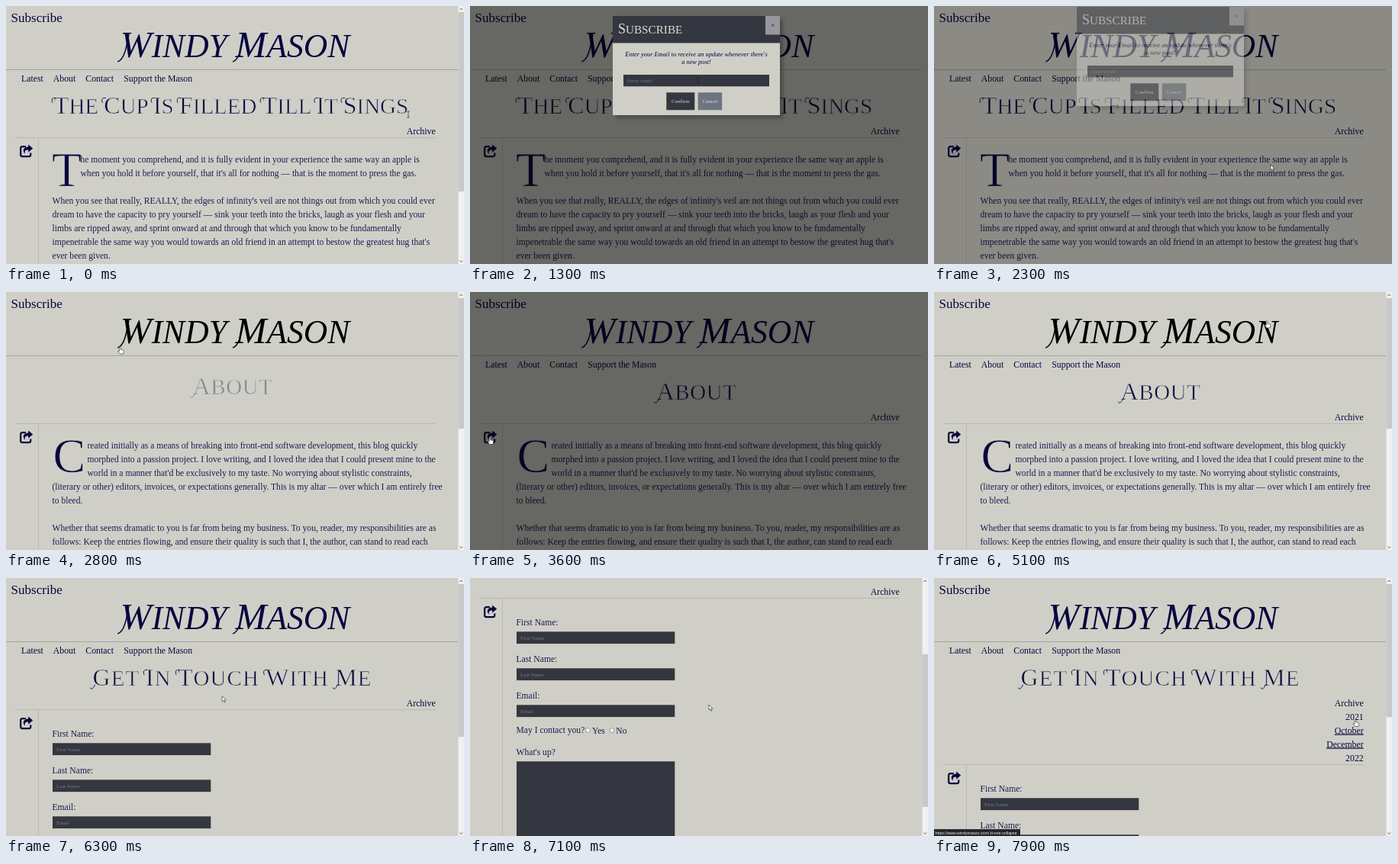
Recreate the animation shown at these times as an HTML page. Size 600 by 338 pixels, loop 8000 ms.

```html
<!DOCTYPE html>
<html lang="en">
<head>
<meta charset="utf-8">
<title>Blog walkthrough</title>
<style>
html, body { margin: 0; width: 100%; height: 100%; overflow: hidden; background: #d0cfc7; }
svg { display: block; width: 100vw; height: 100vh; font-family: "Liberation Serif", serif; fill: #06063f; }
.body { font-size: 11.6px; fill: #1c1c52; }
.nav { font-size: 11.8px; }
.small { font-size: 7px; }
.thin { stroke: #d0cfc7; stroke-width: .75; }
.rule { stroke: #9b9b95; stroke-width: .8; fill: none; }
.faint { stroke: #b4b3ac; }
.swash { stroke: currentColor; fill: none; stroke-linecap: round; }
.dark { fill: #34373f; }
.hint { fill: #747a82; }
.pale { fill: #dcdcd6; }
</style>
</head>
<body>
<svg id="stage" viewBox="0 0 600 338" preserveAspectRatio="none"></svg>
<script>
const NAVY = '#06063f';
const stage = document.getElementById('stage');
const $ = id => document.getElementById(id);

const text = (x, y, s, attrs = '') => `<text x="${x}" y="${y}" ${attrs}>${s}</text>`;
const box = (x, y, w, h, attrs = '') => `<rect x="${x}" y="${y}" width="${w}" height="${h}" ${attrs}/>`;
const rule = (d, kind = '') => `<path class="rule ${kind}" d="${d}"/>`;
const lines = (x, y, list) => list.map((s, i) => text(x, y + i * 18, s, 'class="body"')).join('');
const dropCap = (x, s) => text(x, 236, s, 'font-size="64" class="thin"');

// Capitals with a larger first letter in each word
const caps = (s, x, y, small, big, attrs = '') => {
  const words = s.toUpperCase().split(' ')
    .map(w => `<tspan font-size="${big}">${w[0]}</tspan>${w.slice(1)}`);
  return text(x, y, words.join(' '), `font-size="${small}" ${attrs}`);
};

// words, centre, letter spacing
const heads = [
  ['The Cup Is Filled Till It Sings', 295, 0],
  ['About', 297, .6],
  ['Get In Touch With Me', 296.5, 1.05]
];

const article = dropCap(60, 'T') +
  lines(97.5, 205, [
    'he moment you comprehend, and it is fully evident in your experience the same way an apple is',
    "when you hold it before yourself, that it's all for nothing — that is the moment to press the gas."
  ]) +
  lines(60.5, 259, [
    "When you see that really, REALLY, the edges of infinity's veil are not things out from which you could ever",
    'dream to have the capacity to pry yourself — sink your teeth into the bricks, laugh as your flesh and your',
    'limbs are ripped away, and sprint onward at and through that which you know to be fundamentally',
    "impenetrable the same way you would towards an old friend in an attempt to bestow the greatest hug that's",
    'ever been given.'
  ]);

const about = dropCap(61.5, 'C') +
  lines(106.5, 205, [
    'reated initially as a means of breaking into front-end software development, this blog quickly',
    'morphed into a passion project. I love writing, and I loved the idea that I could present mine to the',
    "world in a manner that'd be exclusively to my taste. No worrying about stylistic constraints,"
  ]) +
  lines(60.5, 259, [
    '(literary or other) editors, invoices, or expectations generally. This is my altar — over which I am entirely free',
    'to bleed.', '',
    'Whether that seems dramatic to you is far from being my business. To you, reader, my responsibilities are as',
    'follows: Keep the entries flowing, and ensure their quality is such that I, the author, can stand to read each'
  ]);

const radio = x => `<circle cx="${x}" cy="345.5" r="2.9" fill="#f6f6f6" stroke="#777" stroke-width=".7"/>`;
const contact = ['First Name', 'Last Name', 'Email'].map((s, i) =>
  text(60.5, 208 + i * 48, s + ':', 'class="body"') +
  box(61, 216.3 + i * 48, 207.3, 15.8, 'class="dark"') +
  text(66, 226.5 + i * 48, s, 'class="small hint"')).join('') +
  text(60.5, 349, 'May I contact you?', 'class="body"') +
  radio(154.5) + text(160, 349.5, 'Yes', 'class="body"') +
  radio(186) + text(191.3, 349.5, 'No', 'class="body"') +
  text(60.5, 378, "What's up?", 'class="body"') +
  box(61, 386.3, 207.3, 110, 'class="dark"');

const shareIcon = `<path d="M26 184.2h-4.4q-2.4 0-2.4 2.4v8.2q0 2.4 2.4 2.4h8.3q2.4 0 2.4-2.4v-2.3"
    fill="none" stroke="${NAVY}" stroke-width="2.2"/>
  <path d="M29.2 181.4l6 5.2-6 5.2v-3.2c-3.6 0-5.2 1.3-4.2 5.3-4.3-4.4-2-9.2 4.2-9.4z"/>`;

const modal = (id, title, content) => `<g id="${id}">
  ${box(191, 17, 219, 130, 'fill="#000" opacity=".28" filter="url(#soft)"')}
  ${box(187, 13, 219, 130, 'fill="#d0cfc7"')}
  ${box(187, 13, 219, 35.5, 'class="dark"')}
  ${caps(title, 194, 36, 15.2, 18, 'class="pale"')}
  ${box(387, 13, 19, 24.5, 'fill="#96979b"')}
  ${text(396.5, 28, '×', 'font-size="9" text-anchor="middle"')}
  ${content}</g>`;

const note = (y, s) => text(296.5, y, s, 'font-size="8.4" font-style="italic" text-anchor="middle"');
const subscribeForm =
  note(66, "Enter your Email to receive an update whenever there's") + note(76, 'a new post!') +
  box(201, 90, 191, 15.3, 'class="dark"') +
  text(206, 100, 'Enter email', 'class="small hint" font-style="italic"') +
  box(257.3, 113.3, 37, 23, 'class="dark"') +
  text(275.8, 127.3, 'Confirm', 'class="small pale" text-anchor="middle"') +
  box(298.7, 113.3, 31.5, 23, 'fill="#6d7581"') +
  text(314.4, 127.3, 'Cancel', 'class="small pale" text-anchor="middle"');

const pointers = {
  arrow: '<path d="M0 0v7l1.6-1.4 1.2 2.7 1.2-.5-1.2-2.6h2.2z" fill="#fff" stroke="#222" stroke-width=".6"/>',
  hand: `<path d="M-.8 .6q.8-1 1.6 0v3.2l3 .7q1.1.3 1 1.4l-.6 3.6h-4.6l-2.6-3.7q.5-1 2.2.3z"
    fill="#fff" stroke="#222" stroke-width=".6"/>`,
  beam: '<path d="M-1.6-4h3.2M0-4v8M-1.6 4h3.2" fill="none" stroke="#222" stroke-width=".7"/>'
};

stage.innerHTML = `
<defs><filter id="soft"><feGaussianBlur stdDeviation="2.5"/></filter></defs>
${box(0, 0, 600, 338, 'fill="#d0cfc7"')}
<g id="page">
  ${text(6.5, 21, 'Subscribe', 'font-size="17.1"')}
  <g id="logo">${caps('Windy Mason', 300, 66.7, 43.5, 49,
    'id="logoText" font-style="italic" text-anchor="middle"')}</g>
  ${rule('M0 83.5H592')}
  <g id="nav" class="nav">
    ${text(20, 99, 'Latest')}${text(61.8, 99, 'About')}
    ${text(104.3, 99, 'Contact')}${text(154.3, 99, 'Support the Mason')}
  </g>
  ${heads.map(([s, x, gap], i) => `<g id="head${i}">${caps(s, x, 141, 29, 32,
    `id="headText${i}" class="thin" text-anchor="middle" letter-spacing="${gap}"`)}</g>`).join('')}
  <g id="archive" class="nav" text-anchor="end">
    ${text(562.7, 167.5, 'Archive')}
    <g id="years">${text(562.7, 185.5, '2021')}
      <g id="months" text-decoration="underline">${text(562.7, 203.5, 'October')}${text(562.7, 221.5, 'December')}</g>
      ${text(562.7, 203.5, '2022', 'id="lastYear"')}</g>
  </g>
  <g id="lower">
    ${rule('M12 172.5H563M42.5 172.5V700', 'faint')}${shareIcon}
    ${[article, about, contact].map((s, i) => `<g id="copy${i}">${s}</g>`).join('')}
  </g>
</g>
<g id="bar">
  ${box(592.5, 0, 7.5, 338, 'fill="#f0f0ef"')}
  ${box(592.5, 8, 7.5, 100, 'id="thumb" fill="#c8c8c7"')}
  <path d="M594.5 5l1.8-2 1.8 2M594.5 333.5l1.8 2 1.8-2" fill="none" stroke="#555" stroke-width=".9"/>
</g>
${box(0, 0, 600, 338, 'id="shade" fill="#000"')}
${modal('subscribe', 'Subscribe', subscribeForm)}
${modal('share', 'Share', '')}
<g id="status">${box(0, 329, 113, 9, 'fill="#25262a"')}
  ${text(1.5, 335.7, 'https://www.windymason.com/.tt-one-collapse',
    'fill="#eee" font-size="5.3" font-family="Liberation Sans, sans-serif"')}</g>
<g id="cursor">${Object.entries(pointers).map(([k, s]) => `<g id="${k}">${s}</g>`).join('')}</g>`;

// Flourishes hang on the capitals wherever they land
function addSwashes(group, label, words, curve, width) {
  let d = '';
  [...words].forEach((c, i) => {
    if (/[A-Z]/.test(c)) {
      const p = $(label).getStartPositionOfChar(i);
      d += `M${p.x} ${p.y}` + curve(c);
    }
  });
  $(group).insertAdjacentHTML('beforeend', `<path class="swash" stroke-width="${width}" d="${d}"/>`);
}
addSwashes('logo', 'logoText', 'Windy Mason', () => 'm11-29c-3 17-6 32-14 35', 1.5);
heads.forEach(([s], i) => addSwashes('head' + i, 'headText' + i, s,
  c => /[AGM]/.test(c) ? 'm3-1c-2 5-5 7-6 4' : 'm2-20.5c-4-1-6 2-4 6', .9));

const clamp = v => Math.max(0, Math.min(1, v));
const ramp = (t, from, to) => clamp((t - from) / (to - from));
const ease = v => v * v * (3 - 2 * v);
const show = (id, on) => { $(id).style.display = on ? '' : 'none'; };
const move = (id, x, y) => $(id).setAttribute('transform', `translate(${x} ${y})`);
const fade = (id, v) => { show(id, v > 0); $(id).setAttribute('opacity', v); };

// time, x, y, pointer
const route = [
  [0, 527, 142, 'beam'], [100, 527, 142, 'arrow'], [500, 40, 16, 'hand'], [900, 40, 16, 'arrow'],
  [1300, 299, 98, 'beam'], [1800, 299, 98, 'arrow'], [2100, 441, 208, 'arrow'], [2300, 441, 208, 'arrow'],
  [2600, 76, 94, 'hand'], [2700, 76, 94, 'hand'], [2800, 149.5, 71.5, 'hand'], [2900, 149.5, 71.5, 'arrow'],
  [3200, 26, 190, 'hand'], [4100, 26, 190, 'arrow'], [4800, 458, 300, 'arrow'], [5000, 458, 180, 'arrow'],
  [5100, 436, 37.5, 'hand'], [5200, 436, 37.5, 'arrow'], [5600, 122, 94, 'hand'], [6000, 122, 94, 'arrow'],
  [6400, 313, 166, 'arrow'], [7200, 313, 166, 'arrow'], [7500, 546, 163, 'hand'], [7600, 546, 163, 'hand'],
  [7700, 552, 185, 'hand'], [8000, 552, 185, 'hand']
];

function pointerAt(t) {
  let i = route.length - 2;
  while (route[i][0] > t) i--;
  const [a, x, y, kind] = route[i], [b, u, v] = route[i + 1];
  const p = ease(ramp(t, a, b));
  return { x: x + (u - x) * p, y: y + (v - y) * p, kind };
}

// Moves a dialog and returns how far the page is dimmed behind it
function openModal(t, id, start, end) {
  const p = t < end ? ease(ramp(t, start + 300, start + 500)) : 1 - ramp(t, end, end + 100);
  fade(id, p);
  move(id, 0, -24 * (1 - p));
  return ramp(t, start, start + 300) * (1 - ramp(t, end, end + 150));
}

function render(t) {
  const page = t < 2650 ? 0 : t < 5750 ? 1 : 2;
  const born = [-1000, 2650, 5750][page];
  const intro = ramp(t, born, born + 400);
  const late = ramp(t, born + 200, born + 500);
  const scroll = 146 * ease(ramp(t, 6350, 6700)) * (1 - ease(ramp(t, 7100, 7400)));
  const opened = ramp(t, 7500, 7600), months = ramp(t, 7700, 7800);
  const extra = 36 * (opened + months);

  heads.forEach((_, i) => { show('head' + i, i === page); show('copy' + i, i === page); });
  fade('head' + page, intro);
  move('head' + page, 0, -11 * (1 - intro));
  fade('nav', late);
  fade('archive', late);
  fade('years', opened);
  fade('months', months);
  move('lastYear', 0, 36 * months);
  move('lower', 0, extra);
  move('page', 0, -scroll);

  const dim = .5 * Math.max(
    openModal(t, 'subscribe', 600, 2250),
    openModal(t, 'share', 3300, 4950));
  fade('shade', dim);
  show('bar', dim === 0);
  $('thumb').setAttribute('y', 8 + scroll * .63);
  $('thumb').setAttribute('height', [235, 171, 200 - extra * .36][page]);

  const c = pointerAt(t);
  const hover = !dim && !scroll && c.x > 141 && c.x < 454 && c.y > 26 && c.y < 78;
  const ink = hover ? '#000' : NAVY;
  $('logo').setAttribute('fill', ink);
  $('logo').style.color = ink;
  move('cursor', c.x, c.y);
  Object.keys(pointers).forEach(k => show(k, k === c.kind));
  show('status', t >= 7700);
}

stage.style.color = NAVY;
const begin = performance.now();
function tick() {
  const t = (performance.now() - begin) % 8000;
  render(Math.floor(t / 100) * 100);
  requestAnimationFrame(tick);
}
tick();
</script>
</body>
</html>
```
